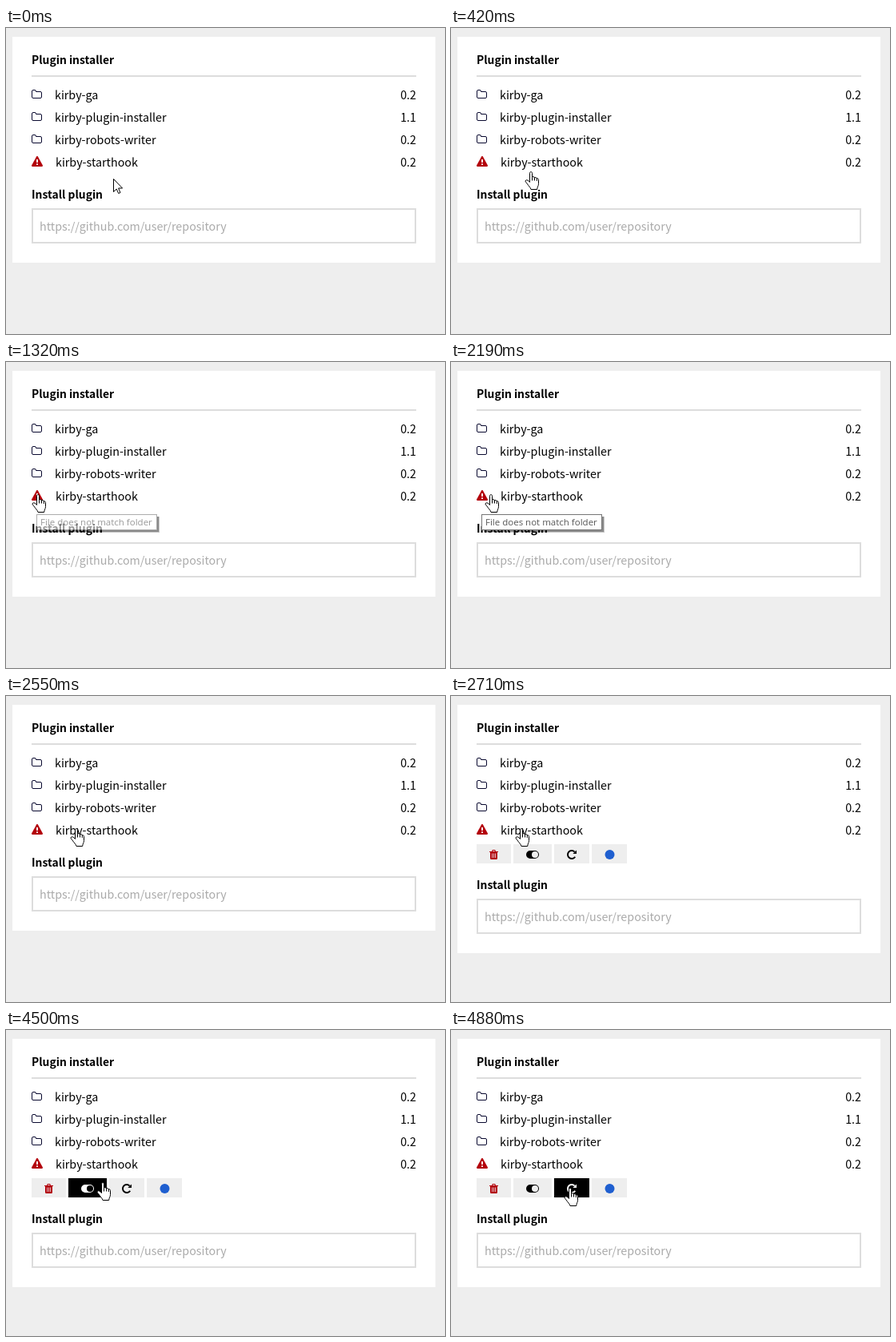
An HTML page for the animation above (8 s loop, 549 px wide and 382 px high).

```html
<!DOCTYPE html>
<html lang="en">
<head>
<meta charset="utf-8">
<title>Plugin installer</title>
<style>
  html, body { margin: 0; width: 100%; height: 100%; overflow: hidden; background: #eee; }
  svg { display: block; width: 549px; height: 382px; }
  text { font: 14.3px "Noto Sans CJK JP", "Noto Sans CJK SC", "Noto Sans CJK KR", "Noto Sans CJK", "Open Sans", sans-serif; }
  .head { font-weight: 700; font-size: 13.85px; }
  .end { text-anchor: end; }
  .hint { fill: #aaa; }
  .tip { font: 11.5px "Open Sans", "Noto Sans", sans-serif; fill: #575757; }
  .folder { fill: none; stroke: #0a0a30; }
  .red { fill: #b3000a; }
  .btn { color: #000; }
  .btn rect { fill: #eee; }
  .btn.on { color: #fff; }
  .btn.on rect { fill: #000; }
  .pointer { fill: #fff; stroke: #000; stroke-linejoin: round; }
</style>
</head>
<body>
<svg viewBox="0 0 549 382">
  <rect id="card" x="8" y="11" width="529" height="282" fill="#fff"/>
  <text class="head" x="32" y="45">Plugin installer</text>
  <rect x="32" y="59" width="481" height="2" fill="#ddd"/>
  <g id="rows"></g>

  <g id="tools">
    <g class="btn">
      <rect x="32" y="185" width="43" height="24"/>
      <g transform="translate(48 192)" fill="none" stroke="#b3000a">
        <path class="red" stroke="none" d="M0 2H3L3.8 0H7.2L8 2H11V3H10V10.5Q10 12 8.7 12H2.3Q1 12 1 10.5V3H0ZM4.2 2H6.8L6.5 1H4.5Z" fill-rule="evenodd"/>
        <path d="M3.5 4.5V10M5.5 4.5V10M7.5 4.5V10" stroke="#eee" stroke-width=".8"/>
      </g>
    </g>
    <g class="btn" id="toggle">
      <rect x="78" y="185" width="48" height="24"/>
      <path transform="translate(94 193)" fill="currentColor" fill-rule="evenodd"
        d="M5 0H11A5 5 0 0 1 11 10H5A5 5 0 0 1 5 0ZM11 1A4 4 0 0 0 11 9A4 4 0 0 0 11 1Z"/>
    </g>
    <g class="btn" id="reload">
      <rect x="129" y="185" width="44" height="24"/>
      <g transform="translate(145 192)">
        <path d="M9.6 2.6A5 5 0 1 0 10.2 8.7" fill="none" stroke="currentColor" stroke-width="2"/>
        <path d="M12 .4V5H7.4Z" fill="currentColor"/>
      </g>
    </g>
    <g class="btn">
      <rect x="176" y="185" width="44" height="24"/>
      <circle cx="198.5" cy="198" r="6" fill="#1f5fd0"/>
    </g>
  </g>

  <g id="form">
    <text class="head" x="32" y="213">Install plugin</text>
    <rect x="33" y="226" width="479" height="42" fill="#fff" stroke="#ddd" stroke-width="2"/>
    <text class="hint" x="42" y="253">https://github.com/user/repository</text>
  </g>

  <g id="tip">
    <path d="M189 193H192V213H41V210H189Z" opacity=".22"/>
    <path d="M189 193H191V212H41V210H189Z" opacity=".3"/>
    <g id="tipBody">
      <rect x="38.5" y="190.5" width="150" height="19" fill="#fff" stroke="#767676"/>
      <text class="tip" x="43" y="204">File does not match folder</text>
    </g>
  </g>

  <path class="pointer" id="arrow" d="M.5.5V16.5L4.2 13L6.7 18.5L9 17.5L6.6 12H11.6Z"/>
  <g class="pointer" id="hand">
    <path d="M6.5 13.5V2.3C6.5 0 9.5 0 9.5 2.3V7.4C9.9 6.2 12.5 6.4 12.5 8C12.9 7.1 15.1 7.4 15.3 9C15.8 8.4 17.5 8.8 17.5 10.4V15.5C17.5 18.2 15.9 19 15.7 22.5H8C7.5 20 5 18.2 3.7 16C2.7 14.4 1 13.2 1 12C1.5 10 4.3 10.4 6.5 13.5Z"/>
    <path d="M9.5 7.4V11.5M12.5 8V11.5M15.3 9V12" fill="none"/>
  </g>
</svg>

<script>
const LOOP = 8000;
const get = id => document.getElementById(id);

const plugins = [
  ["kirby-ga", "0.2"],
  ["kirby-plugin-installer", "1.1"],
  ["kirby-robots-writer", "0.2"],
  ["kirby-starthook", "0.2", true]
];
const folder = `<path class="folder" d="M.5 2A1.5 1.5 0 0 1 2 .5H4A1.5 1.5 0 0 1 5.5 2V2.5H11
  A1.5 1.5 0 0 1 12.5 4V9A1.5 1.5 0 0 1 11 10.5H2A1.5 1.5 0 0 1 .5 9Z"/>`;
const warning = `<path class="red" d="M6.1.5Q7-.9 7.9.5L13.8 11.3Q14.4 12.9 13 13H1Q-.4 12.9.2 11.3Z"/>
  <path d="M7 4V8M7 9.2V11" stroke="#fff" stroke-width="1.8"/>`;

get("rows").innerHTML = plugins.map(([name, version, broken], i) => {
  const y = 89 + 28 * i;
  return `<g transform="translate(32 ${y - (broken ? 13 : 12)})">${broken ? warning : folder}</g>
    <text x="${broken ? 62 : 61}" y="${y}">${name}</text>
    <text class="end" x="513" y="${y}">${version}</text>`;
}).join("");

// [time, x, y, shape]
const moves = [
  [0, 134, 188, "arrow"], [150, 125, 187, "arrow"], [270, 116, 185, "arrow"],
  [420, 92, 179, "hand"], [580, 65, 171, "hand"], [730, 32, 165, "hand"],
  [2190, 42, 165, "hand"], [2310, 54, 165, "hand"], [2430, 68, 165, "hand"],
  [2550, 80, 165, "hand"], [4240, 90, 173, "hand"], [4380, 99, 184, "hand"],
  [4500, 113, 190, "hand"], [4620, 130, 195, "hand"], [4740, 143, 197, "hand"],
  [4880, 141, 197, "hand"]
];
// [time, tooltip opacity, body opacity]
const fades = [[0, 0, 0], [1320, 1, .6], [1480, 1, 1], [2310, .5, 1], [2430, 0, 1]];
// [time, hovered button]
const hovers = [[0, ""], [4380, "toggle"], [4620, "reload"]];

const at = (steps, t) => steps.findLast(s => s[0] <= t);

function draw(t) {
  const [, x, y, shape] = at(moves, t);
  for (const id of ["arrow", "hand"]) {
    get(id).setAttribute("visibility", id === shape ? "visible" : "hidden");
    get(id).setAttribute("transform", `translate(${x} ${y})`);
  }

  const [, tip, body] = at(fades, t);
  get("tip").setAttribute("opacity", tip);
  get("tipBody").setAttribute("opacity", body);

  const open = t >= 2710;
  get("tools").setAttribute("visibility", open ? "visible" : "hidden");
  get("form").setAttribute("transform", `translate(0 ${open ? 28 : 0})`);
  get("card").setAttribute("height", open ? 310 : 282);

  const hover = at(hovers, t)[1];
  for (const id of ["toggle", "reload"]) get(id).classList.toggle("on", id === hover);
}

const start = performance.now();
function tick() {
  draw((performance.now() - start) % LOOP);
  requestAnimationFrame(tick);
}
tick();
</script>
</body>
</html>
```
